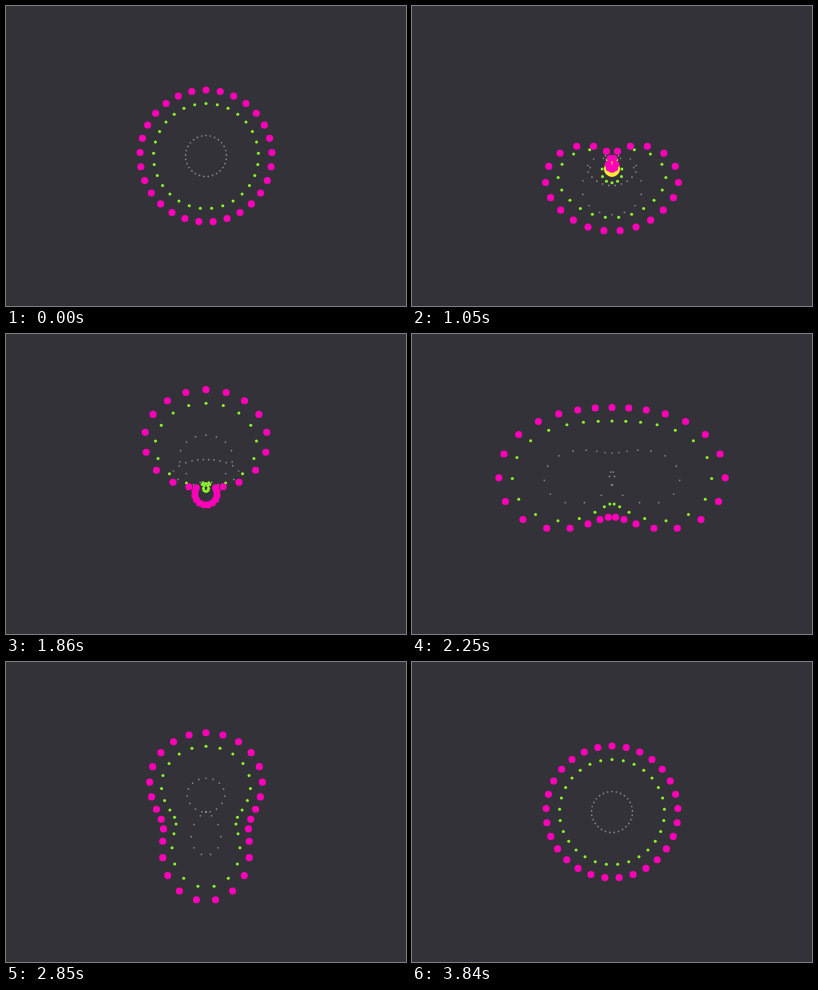
Write an HTML page with a canvas that moves like this. It is 400 px wide and 300 px high and loops after 3.87 s.

```html
<!DOCTYPE html>
<html lang="en">
<head>
<meta charset="utf-8">
<title>Elastic rings</title>
<style>
html, body { margin: 0; height: 100%; overflow: hidden; background: #333238; }
canvas { display: block; }
</style>
</head>
<body>
<canvas id="stage" width="400" height="300"></canvas>
<script>
const ctx = document.getElementById('stage').getContext('2d');
const LOOP = 3870, STEP = 30, DOTS = 29, CX = 200, CY = 150;

// Back to front; every ring is pushed by the same wave.
const RINGS = [
  { radius: 20.5, size: 0.85, colour: '#88878c' },
  { radius: 52.5, size: 1.5, colour: '#8df52a' },
  { radius: 66, size: 3.55, colour: '#ff00b8' },
];

// Turning points of the swing: seconds and push for the top dot,
// and how much each grows per unit of depth below the top.
const SWING = [
  { at: 0, lag: 0, push: 0, grow: 0 },
  { at: 0.46, lag: 0.375, push: 3.5, grow: 3 },
  { at: 1.11, lag: 0.375, push: -81, grow: 18 },
  { at: 1.15, lag: 0.495, push: -81, grow: 18 },
  { at: 2, lag: 0.325, push: 36, grow: 14 },
  { at: 2.5, lag: 0.285, push: -15, grow: -5 },
  { at: 2.95, lag: 0.245, push: 17, grow: 0.5 },
  { at: 3.3, lag: 0.275, push: -3, grow: 1.5 },
  { at: 3.6, lag: 0.2, push: 0, grow: 0 },
];

// Radial push at time t; depth runs from 0 at the top to 2 at the bottom.
function wave(t, depth) {
  const time = key => key.at + key.lag * depth;
  const push = key => key.push + key.grow * depth;
  const next = SWING.findIndex(key => time(key) > t);
  if (next < 0) return 0;
  const a = SWING[next - 1], b = SWING[next];
  const p = (t - time(a)) / (time(b) - time(a));
  return push(a) + (push(b) - push(a)) * (1 - Math.cos(Math.PI * p)) / 2;
}

// The ball slows inside the ring, then drops away.
function ballY(t) {
  const s = t - 0.8;
  return 117 + 163 * s + 328 * s ** 3;
}

function disc(x, y, r, colour) {
  ctx.fillStyle = colour;
  ctx.beginPath();
  ctx.arc(x, y, r, 0, 2 * Math.PI);
  ctx.fill();
}

function draw(t) {
  ctx.fillStyle = '#333238';
  ctx.fillRect(0, 0, 400, 300);
  disc(CX, ballY(t), 8, '#ffee33');

  for (const { radius, size, colour } of RINGS) {
    for (let i = 0; i < DOTS; i++) {
      const angle = 2 * Math.PI * i / DOTS;
      const r = radius + wave(t, 1 - Math.cos(angle));
      disc(CX + r * Math.sin(angle), CY - r * Math.cos(angle), size, colour);
    }
  }
}

const start = performance.now();
function frame() {
  const t = (performance.now() - start) % LOOP;
  draw(Math.floor(t / STEP) * STEP / 1000);
  requestAnimationFrame(frame);
}
frame();
</script>
</body>
</html>
```
